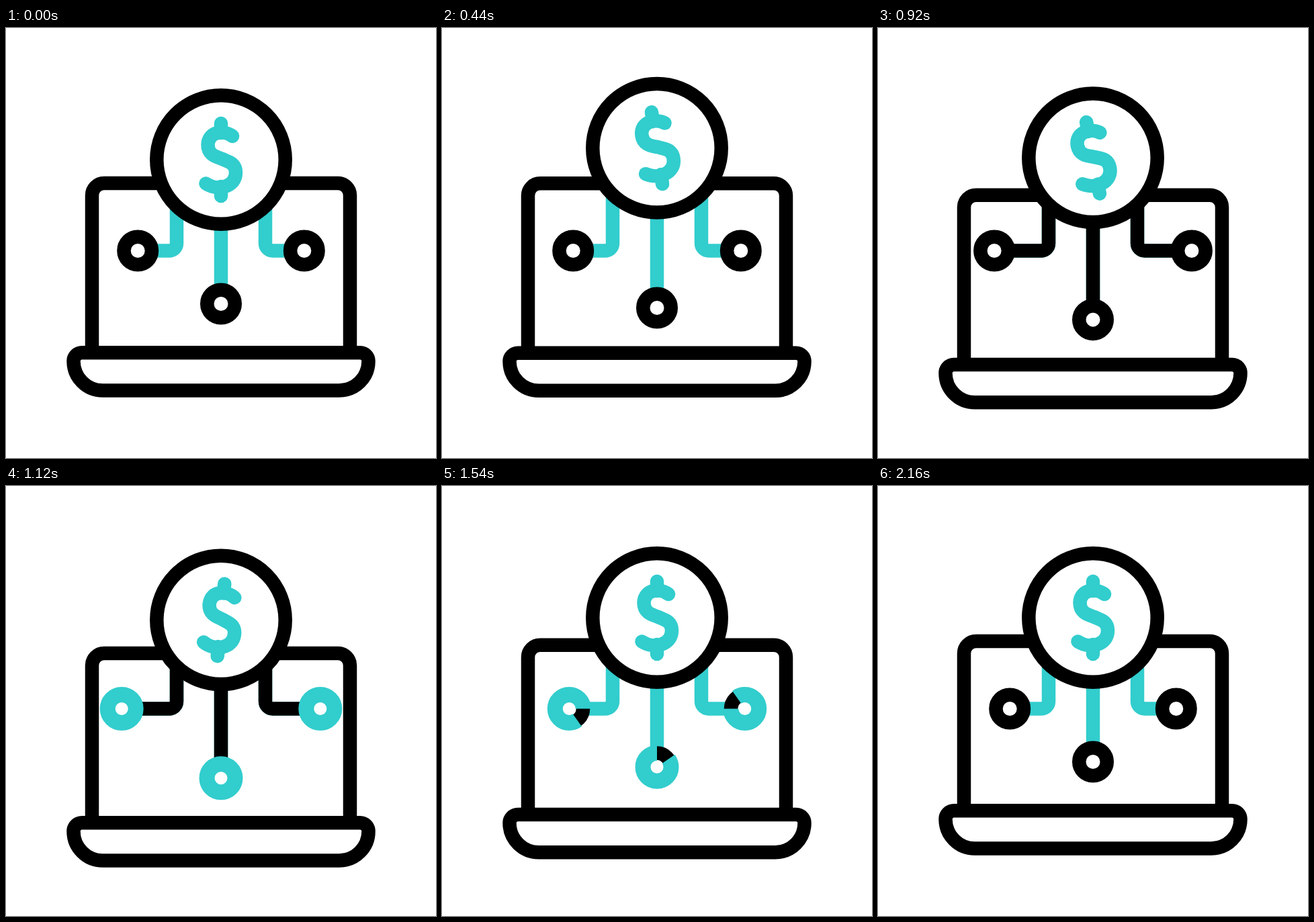
These frames come from a looping animation (640x640 px, 2500 ms). An HTML page:

```html
<!DOCTYPE html>
<html lang="en">
<head>
<meta charset="utf-8">
<style>
html, body { margin: 0; height: 100%; overflow: hidden; background: #fff; }
svg { display: block; width: 100vw; height: 100vh; fill: none; stroke-width: 20.5; stroke-linecap: round; }
.ink { stroke: #000; }
.teal { stroke: #32cdcd; }
.white { fill: #fff; }
</style>
</head>
<body>
<svg viewBox="0 0 640 640">
  <g id="laptop" class="ink">
    <path d="M128 483V249A18 18 0 0 1 146 231H494A18 18 0 0 1 512 249V483" stroke-linecap="butt"/>
    <path class="white" d="M113 483.3H527A12.5 12.5 0 0 1 539.5 496A43.5 43.5 0 0 1 496 539.5H144A43.5 43.5 0 0 1 100.5 496A12.5 12.5 0 0 1 113 483.3Z"/>
  </g>
  <g id="links"></g>
  <g id="coin">
    <circle class="ink white" cx="320" cy="196" r="95.7"/>
    <path id="dollar" class="teal" d="M337 161C325 152 301 153 300.5 174C300.5 190 315 192 322 195C331 199 342 201 342 215C342 237 315 243 297.5 231.5M320 142V156M320 236V250"/>
  </g>
</svg>
<script>
const LOOP = 2500;
const $ = id => document.getElementById(id);

// Sine ease from 0 to 1 between two times.
function ease(t, from, to) {
  const u = Math.min(1, Math.max(0, (t - from) / (to - from)));
  return (1 - Math.cos(Math.PI * u)) / 2;
}

// Eases up to 1, holds, and eases back to 0.
const pulse = (t, up, top, down, end) => ease(t, up, top) - ease(t, down, end);

// One full sine swing.
function wobble(t, start, period) {
  const u = (t - start) / period;
  return u > 0 && u < 1 ? Math.sin(2 * Math.PI * u) : 0;
}

const coinY = t => -28 * pulse(t, 110, 685, 685, 1050) + 8.5 * wobble(t, 860, 600);
const spin = t => -30 * pulse(t, 270, 745, 745, 1040) + 6.5 * wobble(t, 960, 480);
const laptopY = t => 21 * pulse(t, 250, 980, 1165, 1840) - 3 * pulse(t, 20, 250, 1840, 2150);
const side = t => 27 * ease(t, 250, 1010) - 3 * ease(t, 20, 250)
  - 38 * ease(t, 1340, 1770) + 14 * ease(t, 1770, 2150);
const drop = t => 24.3 * ease(t, 158, 1010)
  - 35.3 * ease(t, 1340, 1760) + 11 * ease(t, 1760, 2150);

function add(parent, tag, attrs) {
  const el = document.createElementNS("http://www.w3.org/2000/svg", tag);
  return set(parent.appendChild(el), attrs);
}

function set(el, attrs) {
  for (const key in attrs) el.setAttribute(key, attrs[key]);
  return el;
}

// Shows only the part of a unit-length stroke between start and end.
function trim(el, start, end) {
  set(el, {
    visibility: end - start > 0.001 ? "visible" : "hidden",
    "stroke-dasharray": `${end - start} 2`,
    "stroke-dashoffset": -start
  });
}

// A link runs from the coin to a node; route(t) gives the node place and the path.
function makeLink(turn, route) {
  const base = add($("links"), "path", { class: "teal" });
  const flow = add($("links"), "path", { class: "ink", pathLength: 1 });
  const node = add($("links"), "g");
  add(node, "circle", { class: "ink white", r: 20.75 });
  const ring = add(node, "circle", {
    class: "teal", r: 21, pathLength: 1, "stroke-width": 23,
    "stroke-linecap": "butt", transform: `rotate(${turn})`
  });
  return t => {
    const { x, y, d } = route(t);
    set(base, { d });
    set(flow, { d });
    set(node, { transform: `translate(${x} ${y})` });
    trim(flow, ease(t, 1160, 1510), ease(t, 750, 980));
    trim(ring, ease(t, 1490, 1690), ease(t, 920, 1100));
  };
}

function sideRoute(dir) {
  const stem = 320 + 66 * dir;
  return t => {
    const x = 320 + dir * (123.8 + side(t));
    const d = `M${stem} 240V320.5A11 11 0 0 ${dir < 0 ? 1 : 0} ${stem + 11 * dir} 331.5H${x}`;
    return { x, y: 331.5, d };
  };
}

function downRoute(t) {
  const y = 410.5 + drop(t);
  return { x: 320, y, d: `M320 270V${y}` };
}

const links = [
  makeLink(0, sideRoute(-1)),
  makeLink(180, sideRoute(1)),
  makeLink(-90, downRoute)
];

function draw(t) {
  set($("laptop"), { transform: `translate(0 ${laptopY(t)})` });
  set($("coin"), { transform: `translate(0 ${coinY(t)})` });
  set($("dollar"), { transform: `rotate(${spin(t)} 320 196)` });
  for (const link of links) link(t);
}

const begin = performance.now();
function tick() {
  draw((performance.now() - begin) % LOOP);
  requestAnimationFrame(tick);
}
tick();
</script>
</body>
</html>
```
